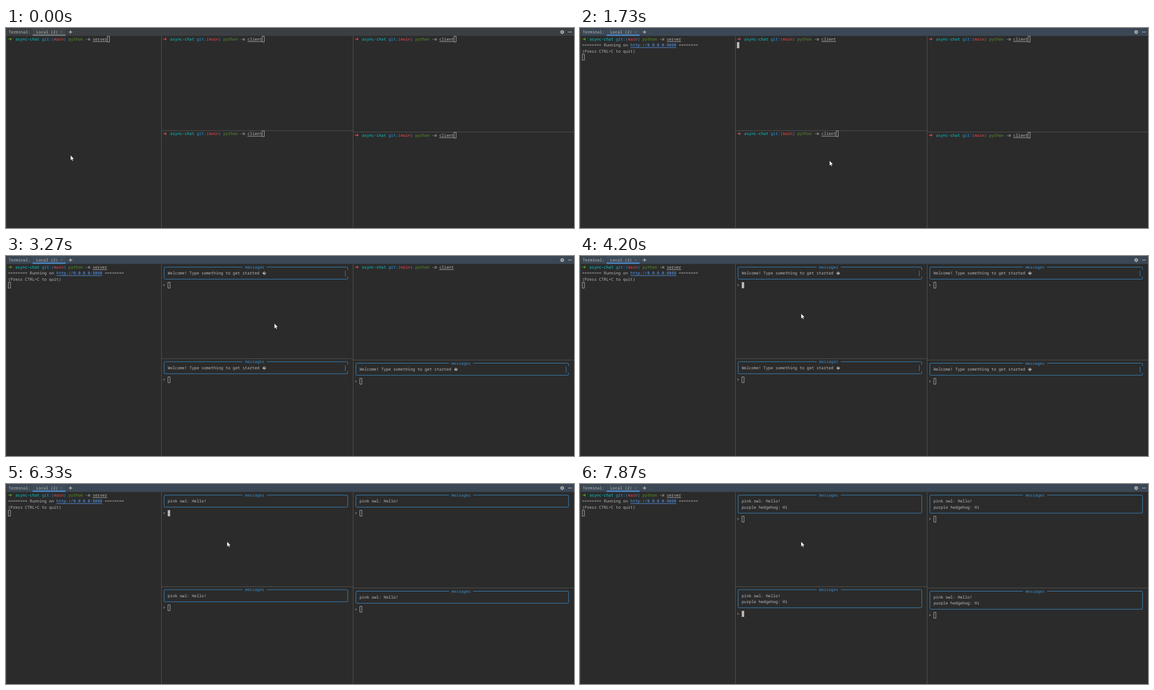
An HTML page for the animation above (8000 ms loop, 1259 px wide and 445 px high).

```html
<!DOCTYPE html>
<html lang="en">
<head>
<meta charset="utf-8">
<title>Async chat in five terminals</title>
<style>
  html, body { margin: 0; width: 100%; height: 100%; overflow: hidden; background: #2b2b2b; }
  svg { display: block; width: 1259px; height: 445px; }
  text {
    font: 8.925px "Noto Sans Mono", "DejaVu Sans Mono", monospace;
    white-space: pre;
    text-rendering: geometricPrecision;
  }
</style>
</head>
<body>
<svg id="stage" viewBox="0 0 1259 445"></svg>
<script>
const LOOP = 8000, STEP = 200 / 3;
const CELL = 5.355, ROW = 13.4;
const GREY = '#bbbbbb', BLUE = '#3993d4', LINK = '#589df6', GREEN = '#5c962c',
      CYAN = '#00d2d2', GIT = '#2b9fe8', RED = '#f54a50', EDGE = '#555759';
const SERVER_UP = 930, HELLO = 6000, HI = 7800;

const stage = document.getElementById('stage');
const timed = [];

// Adds a shape that shows from time `from` until time `to`.
function add(tag, attrs, from = 0, to = LOOP, content = '') {
  const el = document.createElementNS('http://www.w3.org/2000/svg', tag);
  for (const key in attrs) el.setAttribute(key, attrs[key]);
  el.textContent = content;
  stage.append(el);
  if (from > 0 || to < LOOP) timed.push({ el, from, to });
  return el;
}
const rect = (x, y, width, height, fill, from, to) =>
  add('rect', { x, y, width, height, fill }, from, to);
const path = (d, stroke, width = 1, from, to) =>
  add('path', { d, stroke, 'stroke-width': width, fill: 'none' }, from, to);
const label = (x, y, fill, content, from, to) =>
  add('text', { x, y, fill }, from, to, content);

// pane.y is the vertical centre of the first text row.
const colX = (pane, col) => pane.x + col * CELL;
const rowY = (pane, row) => pane.y + row * ROW;

function write(pane, col, row, fill, content, from, to, underline) {
  const x = colX(pane, col), y = rowY(pane, row);
  label(x, y + 3, fill, content, from, to);
  if (underline) path(`M${x} ${y + 5.6}h${content.length * CELL}`, fill, 1, from, to);
}

function prompt(pane, module, arrow, to) {
  path(`M${pane.x + .5} ${pane.y}h7m-2.8 -2.7l2.8 2.7l-2.8 2.7`, arrow, 1.3, 0, to);
  const runs = [[3, CYAN, 'async-chat'], [14, GIT, 'git:('], [19, RED, 'main'],
                [23, GIT, ')'], [25, GREEN, 'python'], [32, GREY, '-m']];
  for (const [col, fill, content] of runs) write(pane, col, 0, fill, content, 0, to);
  write(pane, 35, 0, GREY, module, 0, to, true);
}

// Each key is [time, column, row, style]; style is 'off', 'hollow' or 'solid'.
function cursor(pane, keys) {
  keys.forEach(([from, col, row, style], i) => {
    const to = i + 1 < keys.length ? keys[i + 1][0] : LOOP;
    const x = colX(pane, col), y = rowY(pane, row) - 6.7;
    if (style === 'solid') rect(x, y, CELL, 13.6, GREY, from, to);
    if (style === 'hollow') path(`M${x + .5} ${y + .2}h${CELL - .7}v13h-${CELL - .7}z`, GREY, 1, from, to);
  });
}

function messageBox(pane, lines, from, to) {
  const left = colX(pane, .5), right = colX(pane, pane.cols - .5);
  const top = pane.y, bottom = rowY(pane, lines.length + 1);
  const gap = (pane.cols - 9) >> 1;
  const broken = lines[0].endsWith('\ufffd');
  const side = broken
    ? `V${top + 6.5}M${right - CELL} ${top + 8}V${bottom - 6}M${right} ${bottom - 5.5}V${bottom - 2}`
    : `V${bottom - 2}`;
  path(`M${colX(pane, gap - 1)} ${top}H${left + 2}q-2 0 -2 2V${bottom - 2}q0 2 2 2` +
       `H${right - 2}q2 0 2 -2M${colX(pane, gap + 9)} ${top}H${right - 2}q2 0 2 2${side}`,
       BLUE, 1, from, to);
  write(pane, gap, 0, BLUE, 'messages', from, to);
  lines.forEach((line, i) => write(pane, 2, i + 1, GREY, line, from, to));
  write(pane, 0, lines.length + 2, GREY, '>', from, to);
}

function client(pane) {
  const { ready, typed = [], sent, keys } = pane;
  prompt(pane, 'client', '#ff4050', ready);
  const hello = 'pink owl: Hello!', hi = 'purple hedgehog: Hi';
  messageBox(pane, ['Welcome! Type something to get started \ufffd'], ready, HELLO);
  messageBox(pane, [hello], HELLO, HI);
  messageBox(pane, [hello, hi], HI, LOOP);
  const typing = typed.map(([time, content], i) => {
    write(pane, 2, 3, GREY, content, time, i + 1 < typed.length ? typed[i + 1][0] : sent);
    return [time, 2 + content.length, 3, 'solid'];
  });
  cursor(pane, [[0, 41, 0, 'hollow'], ...keys, ...typing].sort((a, b) => a[0] - b[0]));
}

// Tool window header
rect(0, 0, 1259, 17.5, '#3c3f41');
rect(3, 0, 1256, 17.5, '#3b4754', 70);
rect(59, 0, 73, 17.5, '#414547', 0, 70);
rect(59, 0, 73, 17.5, '#3e4b59', 70);
rect(59, 14.5, 73, 3, '#747a80', 0, 70);
rect(59, 14.5, 73, 3, '#4a88c7', 70);
label(6, 12, GREY, 'Terminal:');
label(67, 12, GREY, 'Local (2)');
path('M121 7l4 4m0 -4l-4 4', '#686e73');
path('M139 9h8m-4 -4v8', '#c0c4c6', 1.3);
path('M1246 9h8', '#b4b8ba', 1.3);
add('circle', { cx: 1232.8, cy: 9, r: 2.4, fill: 'none', stroke: '#b4b8ba', 'stroke-width': 2 });
add('circle', { cx: 1232.8, cy: 9, r: 3.8, fill: 'none', stroke: '#b4b8ba', 'stroke-width': 1.2,
                'stroke-dasharray': '2 1.98' });

// Pane borders
rect(0, 17.5, 2, 428, '#37393b');
path('M344.5 18V445M769.5 18V445M345 228.5H769M770 231.5H1259', EDGE);

// Server pane
const server = { x: 4.7, y: 24.7 };
prompt(server, 'server', '#58a82a');
write(server, 0, 1, GREY, '======== Running on', SERVER_UP);
write(server, 20, 1, LINK, 'http://0.0.0.0:8080', SERVER_UP, LOOP, true);
write(server, 40, 1, GREY, '========', SERVER_UP);
write(server, 0, 2, GREY, '(Press CTRL+C to quit)', SERVER_UP);
cursor(server, [[0, 41, 0, 'hollow'], [70, 41, 0, 'solid'], [600, 0, 1, 'solid'],
                [SERVER_UP, 0, 3, 'solid'], [1070, 0, 3, 'hollow']]);

// Client panes
client({
  x: 347.8, y: 24.7, cols: 77, ready: 2270, sent: HELLO,
  typed: [[4600, 'H'], [4800, 'He'], [4930, 'Hel'], [5070, 'Hell'], [5270, 'Hello'], [5530, 'Hello!']],
  keys: [[1070, 41, 0, 'solid'], [1270, 0, 1, 'solid'], [1870, 0, 1, 'hollow'], [2270, 2, 3, 'hollow'],
         [3670, 2, 3, 'solid'], [HELLO, 2, 3, 'solid'], [6400, 2, 3, 'hollow'], [HI, 2, 4, 'hollow']]
});
client({
  x: 347.8, y: 235.2, cols: 77, ready: 2800, sent: HI,
  typed: [[6930, 'H'], [7130, 'Hi']],
  keys: [[1870, 41, 0, 'solid'], [2070, 0, 1, 'solid'], [2270, 0, 1, 'hollow'], [2800, 2, 3, 'hollow'],
         [6400, 2, 3, 'solid'], [HI, 2, 4, 'solid']]
});
client({
  x: 773, y: 24.7, cols: 89, ready: 3530,
  keys: [[2600, 41, 0, 'solid'], [2730, 0, 1, 'solid'], [3130, 0, 1, 'off'], [3530, 2, 3, 'solid'],
         [3670, 2, 3, 'hollow'], [HI, 2, 4, 'hollow']]
});
client({
  x: 773, y: 238.5, cols: 89, ready: 3070,
  keys: [[2270, 41, 0, 'solid'], [2400, 0, 1, 'solid'], [2600, 0, 1, 'hollow'], [3070, 2, 3, 'hollow'],
         [HI, 2, 4, 'hollow']]
});

// Mouse pointer
const pointer = add('path', { d: 'M0 0V11.5L2.6 9.1L4.4 13L6.2 12.2L4.5 8.4H8z', fill: '#fff',
                              stroke: '#1c1c1c', 'stroke-width': .6 });
const route = [[0, 143, 283], [600, 143, 283], [733, 340, 232], [800, 473, 189], [933, 555, 165],
  [1270, 560, 165], [1530, 555, 235], [1733, 553, 295], [1930, 565, 303], [2133, 898, 303],
  [2270, 905, 294], [2467, 879, 191], [2600, 872, 140], [2930, 872, 138], [3070, 795, 150],
  [3267, 594.5, 150], [3530, 492, 130], [3600, 490, 128], [LOOP, 490, 128]];

function movePointer(t) {
  const i = route.findIndex(stop => stop[0] > t);
  const [t0, x0, y0] = route[i - 1], [t1, x1, y1] = route[i];
  const k = (t - t0) / (t1 - t0);
  pointer.setAttribute('transform', `translate(${x0 + (x1 - x0) * k} ${y0 + (y1 - y0) * k})`);
}

function render() {
  const t = performance.now() % LOOP;
  for (const { el, from, to } of timed)
    el.style.display = t >= from && t < to ? '' : 'none';
  movePointer(Math.min(Math.floor((t + 5) / STEP) * STEP, LOOP - 1));
  requestAnimationFrame(render);
}
render();
</script>
</body>
</html>
```
